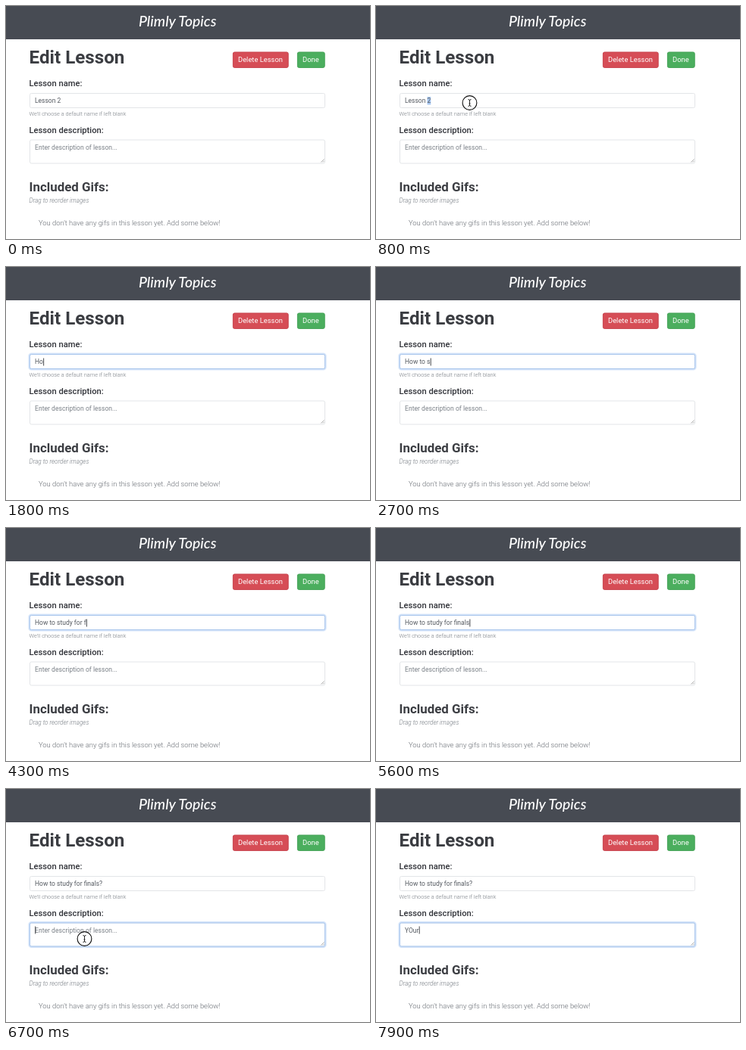
Recreate the animation shown at these times as an HTML page. Size 480 px wide and 308 px high, loop 8000 ms.

```html
<!DOCTYPE html>
<html lang="en">
<head>
<meta charset="utf-8">
<title>Edit Lesson</title>
<style>
  html, body { margin: 0; width: 100%; height: 100%; overflow: hidden; background: #fff; }
  svg { display: block; width: 480px; height: 308px; }
  text { font-family: Roboto, "Open Sans", sans-serif; white-space: pre; }
  .brand { font: italic 500 19.4px Lato, sans-serif; fill: #fff; }
  .heading { font-weight: 600; fill: #3b3d42; }
  .label { font-size: 11.2px; font-weight: 500; fill: #303238; }
  .value { font-size: 8.5px; fill: #555a61; }
  .placeholder { font-size: 8.6px; fill: #7b8188; }
  .hint { font-size: 7.4px; font-weight: 300; fill: #757b82; }
  .button { font-size: 9.4px; fill: #fff; }
  .box { fill: #fff; stroke: #e3e5e8; }
  .ring rect { fill: none; }
  .glow { stroke: #d3e3f9; stroke-width: 2.4; }
  .edge { stroke: #a9c6ec; }
</style>
</head>
<body>
<svg viewBox="0 0 480 308">
  <rect width="480" height="44" fill="#474b53"/>
  <text class="brand" x="175" y="27">Plimly Topics</text>

  <text class="heading" x="30.5" y="75.6" font-size="24.2">Edit Lesson</text>
  <rect x="299.4" y="61" width="72.8" height="20.4" rx="2" fill="#d64d56" stroke="#c7434d"/>
  <text class="button" x="306" y="74.3">Delete Lesson</text>
  <rect x="384.4" y="61" width="35.8" height="20.4" rx="2" fill="#4bae5e" stroke="#43a155"/>
  <text class="button" x="391" y="74.3">Done</text>

  <text class="label" x="30.5" y="106">Lesson name:</text>
  <rect class="box" x="31.5" y="115.5" width="389" height="19" rx="2"/>
  <g id="nameRing" class="ring">
    <rect class="glow" x="30.6" y="114.6" width="390.8" height="20.8" rx="3"/>
    <rect class="edge" x="31.5" y="115.5" width="389" height="19" rx="2"/>
  </g>
  <rect id="selection" x="38" y="120" height="10.5" fill="#a9c9f3"/>
  <text id="name" class="value" x="38" y="128.2"></text>
  <text class="hint" x="30.5" y="145">We'll choose a default name if left blank</text>

  <text class="label" x="30.5" y="167.5">Lesson description:</text>
  <rect class="box" x="31.5" y="177" width="389" height="31" rx="2"/>
  <g id="descriptionRing" class="ring">
    <rect class="glow" x="30.6" y="176.1" width="390.8" height="32.8" rx="3"/>
    <rect class="edge" x="31.5" y="177" width="389" height="31" rx="2"/>
  </g>
  <path d="M415.5 206.5l4-4M417.8 206.5l1.7-1.7" stroke="#888" stroke-width=".7"/>
  <text id="placeholder" class="placeholder" x="38" y="189.6">Enter description of lesson...</text>
  <text id="description" class="value" x="38" y="189.6"></text>

  <text class="heading" x="30.5" y="245" font-size="16.9">Included Gifs:</text>
  <text class="hint" x="30.5" y="260" style="font-size:8.1px;font-style:italic">Drag to reorder images</text>
  <text x="43" y="289.5" font-size="9.4" font-weight="300" fill="#666b72">You don't have any gifs in this lesson yet. Add some below!</text>

  <rect id="caret" width=".9" height="10" fill="#33363b"/>
  <g id="mouse" fill="none" stroke="#111">
    <circle id="click" r="9.4" stroke-width="1.1"/>
    <path id="beam" stroke-width=".9" d="M-2-4.5Q0-4.5 0-3Q0-4.5 2-4.5M0-3V3M-2 4.5Q0 4.5 0 3Q0 4.5 2 4.5M-1 1H1"/>
    <path id="arrow" d="M0 0V11L2.6 8.6L4.4 12.5L6 11.8L4.3 8H7.8Z" fill="#111" stroke="#fff" stroke-width=".7"/>
  </g>
</svg>
<script>
  const LOOP = 8000, STEP = 100, BLINK = 500;
  const nodes = {};
  document.querySelectorAll('[id]').forEach(node => nodes[node.id] = node);

  // [time, text shown from then on]
  const nameKeys = [
    [0, 'Lesson 2'], [1700, 'H'], [1800, 'Ho'], [2000, 'How'], [2100, 'How '],
    [2300, 'How t'], [2400, 'How to'], [2600, 'How to '], [2700, 'How to s'],
    [2800, 'How to st'], [2900, 'How to stu'], [3000, 'How to stud'],
    [3100, 'How to study'], [3200, 'How to study '], [3500, 'How to study f'],
    [3600, 'How to study fo'], [3700, 'How to study for '], [4300, 'How to study for f'],
    [4400, 'How to study for fin'], [4500, 'How to study for final'],
    [4600, 'How to study for finals'], [5700, 'How to study for finals?']
  ];
  const descriptionKeys = [[6600, ''], [7600, 'Y'], [7700, 'YO'], [7800, 'YOu'], [7900, 'YOur']];

  const within = (t, from, to) => t >= from && t < to;
  const progress = (t, from, to) => Math.min(1, Math.max(0, (t - from) / (to - from)));
  const show = (node, visible) => node.setAttribute('display', visible ? 'inline' : 'none');
  const latest = (keys, t) => keys.filter(key => key[0] <= t).pop() || [0, ''];
  const width = node => node.textContent ? node.getComputedTextLength() : 0;

  function drawFields(t) {
    const inDescription = t >= 6600;
    const [nameTime, nameText] = latest(nameKeys, t);
    const [descriptionTime, descriptionText] = latest(descriptionKeys, t);
    nodes.name.textContent = nameText;
    nodes.description.textContent = descriptionText;
    show(nodes.placeholder, !descriptionText);

    const toDescription = progress(t, 6500, 6700);
    nodes.nameRing.setAttribute('opacity', progress(t, 800, 1000) * (1 - toDescription));
    nodes.descriptionRing.setAttribute('opacity', toDescription);

    show(nodes.selection, within(t, 800, 1700));
    if (within(t, 800, 1700)) {
      const start = t < 900 ? nodes.name.getSubStringLength(0, 7) : 0;
      nodes.selection.setAttribute('x', 38 + start);
      nodes.selection.setAttribute('width', width(nodes.name) - start);
    }

    const lastKey = inDescription ? descriptionTime : nameTime;
    const pausedOn = within(t, 3700, 4300);
    const blinkOn = pausedOn || Math.floor((t - lastKey) / BLINK) % 2 === 0;
    show(nodes.caret, t >= 1700 && blinkOn);
    nodes.caret.setAttribute('x', 38.3 + width(inDescription ? nodes.description : nodes.name));
    nodes.caret.setAttribute('y', inDescription ? 181.5 : 120.5);
  }

  function drawMouse(t) {
    const first = t < 6000;
    const p = first ? progress(t, 0, 600) : progress(t, 6000, 6400);
    const eased = 1 - (1 - p) ** 2;
    const [x0, y0, x1, y1] = first ? [160, 318, 123.5, 128] : [123.5, 128, 103.5, 198];
    const x = x0 + (x1 - x0) * eased, y = y0 + (y1 - y0) * eased;
    const overField = within(y, 115, 135) || within(y, 177, 208);
    nodes.mouse.setAttribute('transform', `translate(${x} ${y})`);
    show(nodes.mouse, within(t, 100, 1700) || within(t, 6100, 7600));
    show(nodes.beam, overField);
    show(nodes.arrow, !overField);
    show(nodes.click, within(t, 700, 1000) || within(t, 6600, 6800));
  }

  const startTime = performance.now();
  function frame() {
    const elapsed = (performance.now() - startTime) % LOOP;
    const t = Math.floor(elapsed / STEP) * STEP;
    drawFields(t);
    drawMouse(t);
    requestAnimationFrame(frame);
  }
  frame();
</script>
</body>
</html>
```
